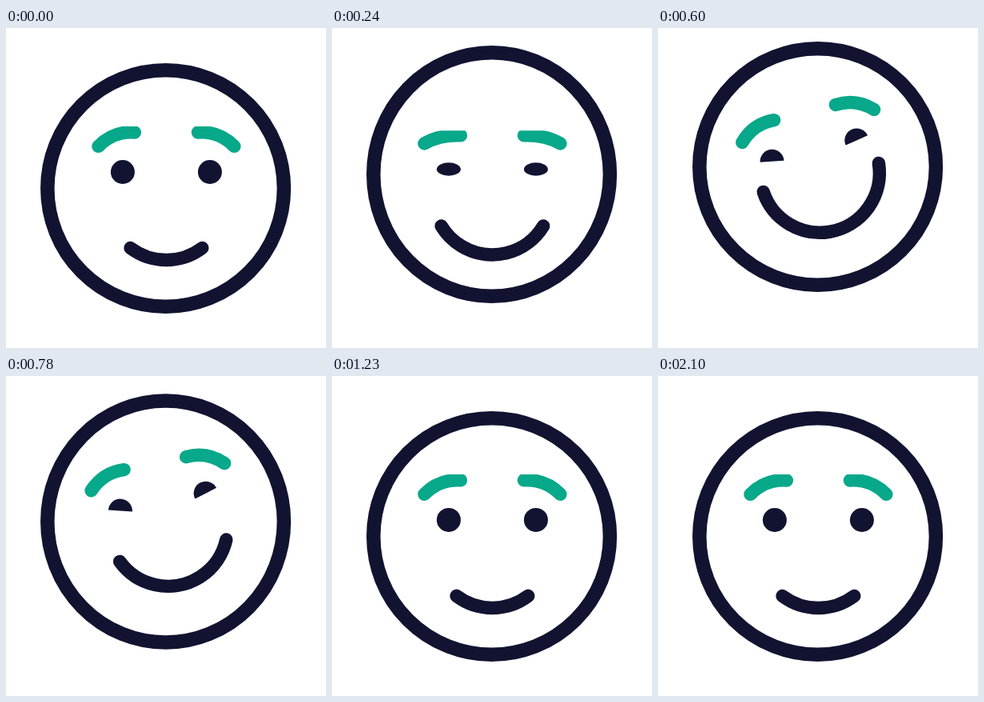
An HTML page with a canvas that plays this animation: 400 px wide and 400 px high, repeating every 3.31 s.

```html
<!DOCTYPE html>
<html lang="en">
<head>
<meta charset="utf-8">
<title>Smiling face</title>
<style>
html, body { margin: 0; width: 100%; height: 100%; overflow: hidden; background: #fff; }
canvas { display: block; width: 100vw; height: 100vh; }
</style>
</head>
<body>
<canvas id="stage" width="400" height="400"></canvas>
<script>
const ctx = document.getElementById('stage').getContext('2d');
const INK = '#121331', GREEN = '#08a88a';
const LOOP = 3310, RAD = Math.PI / 180, TURN = 2 * Math.PI;

// Eases from 0 to 1 between two times.
function ramp(t, from, to) {
  const u = Math.min(1, Math.max(0, (t - from) / (to - from)));
  return u * u * (3 - 2 * u);
}

// Rises during [a, b], holds, and falls during [c, d].
const pulse = (t, a, b, c, d) => ramp(t, a, b) * (1 - ramp(t, c, d));

// Crouch before the jump and again on landing.
const crouch = t => pulse(t, 0, 120, 120, 240) + pulse(t, 800, 910, 910, 1030);
const settle = t => pulse(t, 1020, 1090, 1090, 1230);
const height = t => 200.5 + 11 * crouch(t) - 27 * pulse(t, 120, 320, 690, 930) - settle(t);

function poseAt(t) {
  const squint = pulse(t, 240, 360, 820, 930);
  const stretch = pulse(t, 140, 235, 245, 340) + 0.7 * pulse(t, 690, 780, 790, 890);
  const lag = 50 - 20 * ramp(t, 400, 700);
  return {
    squint,
    faceY: height(t),
    radiusY: 147.8 + 4.5 * (stretch - crouch(t)) + settle(t),
    featuresY: height(t - lag),
    smile: pulse(t, 100, 400, 640, 960),
    tilt: pulse(t, 240, 420, 705, 990),
    lid: squint * (10 + 5.5 * ramp(t, 660, 780)),
    blink: pulse(t, 90, 230, 250, 360) + pulse(t, 840, 930, 990, 1110) + pulse(t, 1850, 1965, 1985, 2100)
  };
}

function strokePath(color, width, trace) {
  ctx.strokeStyle = color;
  ctx.lineWidth = width;
  ctx.beginPath();
  trace();
  ctx.stroke();
}

function drawEye({ blink, squint, lid }) {
  const upper = 15 - 6.8 * blink;
  ctx.save();
  ctx.translate(-54.5, -20.5);
  ctx.rotate(lid * RAD);
  ctx.fillStyle = INK;
  ctx.beginPath();
  ctx.ellipse(0, 0, 15, upper, 0, TURN / 2, TURN);
  ctx.ellipse(0, 0, 15, upper * (1 - squint), 0, 0, TURN / 2);
  ctx.fill();
  ctx.restore();
}

function drawBrow({ blink, tilt }) {
  const inner = -70 + 7.3 * blink;
  // The upright brows are cut flat along the top.
  ctx.save();
  ctx.beginPath();
  ctx.rect(-120, inner - 7.5 + 1.5 * blink - 2 * tilt, 120, 80);
  ctx.clip();
  strokePath(GREEN, 16.4, () => {
    ctx.moveTo(-85, -52.6);
    ctx.quadraticCurveTo(-66, inner - 2 + blink, -39.5, inner);
  });
  ctx.restore();
}

function draw(t) {
  const pose = poseAt(t);
  ctx.fillStyle = '#fff';
  ctx.fillRect(0, 0, 400, 400);
  ctx.lineCap = 'round';
  strokePath(INK, 17.5, () => ctx.ellipse(199.6, pose.faceY, 147.8, pose.radiusY, 0, 0, TURN));

  ctx.save();
  ctx.translate(200.4, pose.featuresY);
  ctx.rotate(-14 * pose.tilt * RAD);
  const half = (37 + 48.5 * pose.smile) * RAD;
  strokePath(INK, 16.5, () =>
    ctx.arc(0, 15 - 7 * pose.smile, 74.5, TURN / 4 - half, TURN / 4 + half));
  for (const side of [1, -1]) {
    ctx.save();
    ctx.scale(side, 1);
    drawEye(pose);
    drawBrow(pose);
    ctx.restore();
  }
  ctx.restore();
}

let start;
function tick(now) {
  start ??= now;
  draw((now - start) % LOOP);
  requestAnimationFrame(tick);
}
draw(0);
requestAnimationFrame(tick);
</script>
</body>
</html>
```
